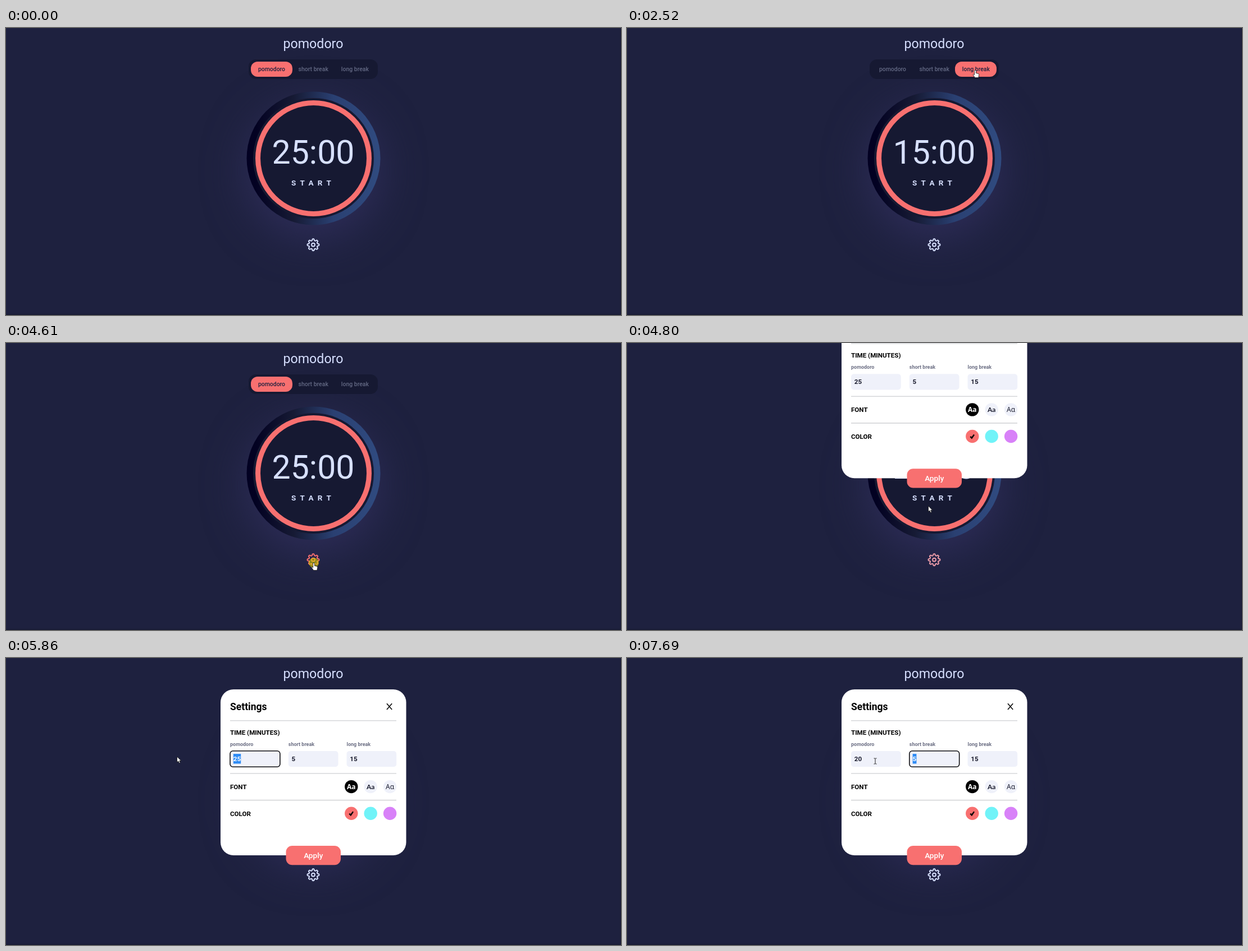
Animation, 1095 px wide and 512 px high, one loop 8 s. Source, as an HTML page:

```html
<!DOCTYPE html>
<html lang="en">
<head>
<meta charset="utf-8">
<title>pomodoro</title>
<style>
  html, body { margin: 0; width: 100%; height: 100%; overflow: hidden; background: #1e213f; }
  svg { display: block; width: 100vw; height: 100vh; font-family: Roboto, "Noto Sans", sans-serif; }
  .mid { text-anchor: middle; }
  .light { fill: #d7e0ff; }
  .tab { font-size: 10.45px; font-weight: 500; fill: #d7e0ff; fill-opacity: .4; }
  .tab.on { fill: #1e213f; fill-opacity: 1; }
  .head { font-size: 11.6px; font-weight: 700; }
  .label { font-size: 9px; font-weight: 700; fill: #6d7085; }
  .value { font-size: 11.6px; font-weight: 700; fill: #1a1c2e; }
  .value.sel { fill: #fff; }
  .rule { stroke: #d6d7da; stroke-width: 1.6; }
  .focus { fill: none; stroke: #101014; stroke-width: 1.6; }
  .aa { font-size: 12px; font-weight: 700; }
</style>
</head>
<body>
<svg viewBox="0 0 1095 512">
  <defs>
    <linearGradient id="rim">
      <stop offset="0" stop-color="#020022"/>
      <stop offset=".07" stop-color="#030222"/>
      <stop offset=".35" stop-color="#161a34"/>
      <stop offset=".65" stop-color="#2a4072"/>
      <stop offset="1" stop-color="#304b80"/>
    </linearGradient>
    <filter id="blur" x="-100%" y="-100%" width="300%" height="300%" color-interpolation-filters="sRGB">
      <feGaussianBlur stdDeviation="38"/>
    </filter>
  </defs>

  <circle cx="547.5" cy="255" r="119" fill="#2e2d59" filter="url(#blur)"/>
  <path d="M0 511H1095M1094.5 0V512" stroke="#181b34" stroke-width="2"/>
  <text class="mid light" x="547" y="36" font-size="23.2">pomodoro</text>

  <rect x="432" y="56" width="230" height="35" rx="13" fill="#161932"/>
  <rect id="pill" y="60" width="74" height="27" rx="12" fill="#f87070"/>
  <g id="tabs"></g>

  <circle cx="547.5" cy="232.5" r="119" fill="url(#rim)"/>
  <circle cx="547.5" cy="232.5" r="107.5" fill="#161932"/>
  <circle cx="547.5" cy="232.5" r="99" fill="none" stroke="#f87070" stroke-width="9"/>
  <text id="clock" class="mid light" x="547" y="242" font-size="59"></text>
  <text class="light" x="508" y="281" font-size="13.5" font-weight="700" letter-spacing="7.3">START</text>

  <g id="gear" transform="translate(547 386.7)" fill="none" stroke-width="2">
    <path id="cog" stroke-linejoin="round"/>
    <circle r="2.9"/>
  </g>

  <g id="modal">
    <rect x="382" y="56" width="330.5" height="296" rx="23" fill="#fff"/>
    <text x="399" y="92.5" font-size="17.5" font-weight="700">Settings</text>
    <path d="M678 81.3L687.2 92M687.2 81.3L678 92" stroke="#000" stroke-width="1.5"/>
    <path class="rule" d="M399 111.7H695M399 206H695M399 253.6H695"/>
    <text class="head" x="399" y="136.7">TIME (MINUTES)</text>
    <g id="fields"></g>
    <text class="head" x="399" y="234">FONT</text>
    <text class="head" x="399" y="281.5">COLOR</text>
    <g id="dots"></g>
    <path d="M611.3 277.6L613.8 280.4L618 274.2" fill="none" stroke="#000" stroke-width="2.4"/>
    <rect x="498.5" y="335" width="97.5" height="34.3" rx="11" fill="#f87070"/>
    <text class="mid" x="547.2" y="356.7" font-size="13.6" font-weight="500" fill="#fff">Apply</text>
  </g>

  <g id="cursor">
    <circle id="press" r="9" fill="#d6cd00" fill-opacity=".6"/>
    <path id="arrow" d="M0 0V10L2.3 8L4 11.6L5.8 10.8L4.2 7.3H7.3Z" fill="#fff" stroke="#111" stroke-width=".8"/>
    <path id="hand" d="M-1.4 1.6Q-1.4 .2 0 .2T1.4 1.6V5.4L5.2 6.3Q7 6.8 6.8 8.6L5.8 13.6H-.4L-4 8.6Q-3.6 7-1.4 8.4Z"
      fill="#fff" stroke="#111" stroke-width=".8"/>
    <path id="beam" d="M-2.5 -5H-.6L0 -4.4L.6 -5H2.5M0 -4.4V4.4M-2.5 5H-.6L0 4.4L.6 5H2.5" fill="none" stroke="#222" stroke-width="1"/>
  </g>
</svg>
<script>
const $ = id => document.getElementById(id);
const LOOP = 8000;
const names = ['pomodoro', 'short break', 'long break'];
const clocks = ['25:00', '5:00', '15:00'];
const fieldX = [399, 502.8, 606.5];

$('tabs').innerHTML = names.map((n, i) =>
  `<text class="tab mid" x="${473 + 74.2 * i}" y="77">${n}</text>`).join('');

$('fields').innerHTML = names.map((n, i) => {
  const x = fieldX[i];
  return `<text class="label" x="${x}" y="156.8">${n}</text>
    <rect x="${x}" y="166" width="88.7" height="28.3" rx="5" fill="#eff1fa"/>
    <rect class="focus" x="${x}" y="165.8" width="88.9" height="28.4" rx="5"/>
    <rect class="mark" x="${x + 5.8}" y="171" width="${i === 1 ? 6.8 : 13.4}" height="17.5" fill="#2f8cf5"/>
    <text class="value" x="${x + 5.8}" y="184">${['25', 5, 15][i]}</text>`;
}).join('');

const fonts = ['"Noto Sans"', 'Lato', '"Noto Sans"'];
$('dots').innerHTML = ['#f87070', '#70f3f8', '#d881f8'].map((c, i) => {
  const x = 614.8 + 34.4 * i;
  return `<circle cx="${x}" cy="229.6" r="11.7" fill="${i ? '#eff1fa' : '#000'}"/>
    <text class="aa mid" x="${x}" y="234" fill="${i ? '#1a1c2e' : '#fff'}"
      style='font-family:${fonts[i]},sans-serif;font-weight:${i > 1 ? 500 : 700}'>${i > 1 ? 'Aɑ' : 'Aa'}</text>
    <circle cx="${x}" cy="277.2" r="11.7" fill="${c}"/>`;
}).join('');

// eight rounded teeth as a polar curve
$('cog').setAttribute('d', 'M' + Array.from({ length: 160 }, (_, i) => {
  const a = i * Math.PI / 80, r = 9.1 + 1.45 * Math.tanh(1.8 * Math.cos(8 * a));
  return (r * Math.cos(a)).toFixed(2) + ' ' + (r * Math.sin(a)).toFixed(2);
}).join('L') + 'Z');

const bursts = [[260, 1040, 12], [1110, 1450, 6], [2110, 2870, 11], [2940, 3700, 11], [3770, 4460, 10],
  [4610, 5370, 12], [5440, 5860, 7], [6590, 7340, 10], [7410, 7690, 5]];

// pointer path: [time, x, y]
const path = [[260, 970, 492], [600, 657, 346], [1040, 614, 66], [1110, 612, 67], [1450, 566, 74], [2110, 566, 74],
  [2340, 620, 75], [2550, 620, 75], [2870, 468, 75], [3010, 468, 75], [3244, 470, 102], [3700, 559, 419],
  [3770, 558, 416], [4200, 548, 392], [4680, 548, 392], [4748, 543, 350], [4817, 536.5, 291], [5024, 541, 185],
  [5370, 450, 184], [5440, 424, 181], [5510, 424, 181], [5860, 304.5, 176], [6590, 304.5, 176],
  [6900, 400, 194], [7270, 522, 183], [7410, 522, 183], [7550, 431, 183], [7690, 442, 184]];

const presses = [[1650, 1780], [2410, 2500], [2940, 3010], [4610, 4680], [5440, 5850], [7340, 7680]];

const clamp = v => Math.max(0, Math.min(1, v));
const show = (el, on) => el.setAttribute('visibility', on ? 'inherit' : 'hidden');
const pick = (t, ...times) => times.filter(s => t >= s).length;

function snap(t) {
  const b = bursts.findLast(([start]) => t >= start);
  if (!b) return t;
  const step = (b[1] - b[0]) / (b[2] - 1);
  return Math.min(b[1], b[0] + step * Math.floor((t - b[0]) / step + .27));
}

function pointer(t) {
  const i = path.findIndex(k => k[0] > t);
  if (i < 1) return (i ? path.at(-1) : path[0]).slice(1);
  const [a, b] = [path[i - 1], path[i]], u = (t - a[0]) / (b[0] - a[0]);
  return [a[1] + (b[1] - a[1]) * u, a[2] + (b[2] - a[2]) * u];
}

function cursorShape(x, y, t, pressed) {
  if (t < 4690) {
    const onTab = y > 57 && y < 90 && x > 436 && x < 658;
    return onTab && t > 1150 || Math.hypot(x - 547, y - 387) < 12 ? 'hand' : 'arrow';
  }
  const onField = t > 5100 && y > 166 && y < 194 && fieldX.some(f => x > f && x < f + 89);
  return onField || pressed ? 'beam' : 'arrow';
}

function draw(t) {
  const s = snap(t);
  const tab = pick(t, 1780, 2490, 3010) % 3;
  $('pill').setAttribute('x', 436 + 74 * tab);
  document.querySelectorAll('.tab').forEach((el, i) => el.classList.toggle('on', i === tab));
  $('clock').textContent = clocks[tab];

  const hot = Math.min(clamp((s - 4130) / 300), clamp((5000 - s) / 300));
  const mix = (a, b) => Math.round(a + (b - a) * hot);
  $('gear').setAttribute('stroke', `rgb(${mix(215, 248)},${mix(224, 112)},${mix(255, 112)})`);

  const lift = s >= 5370 ? 0 : 111 * Math.exp((4817 - s) * .00877);
  $('modal').setAttribute('transform', `translate(0 ${-lift})`);
  show($('modal'), t >= 4610);

  const focused = t < 5440 ? -1 : pick(t, 7340);
  const selected = t >= 5600 && t < 6130 ? 0 : t >= 7460 ? 1 : -1;
  document.querySelectorAll('.focus').forEach((el, i) => show(el, i === focused));
  document.querySelectorAll('.mark').forEach((el, i) => show(el, i === selected));
  document.querySelectorAll('.value').forEach((el, i) => {
    el.classList.toggle('sel', i === selected);
    if (!i) el.textContent = ['25', '2', '20'][pick(t, 6130, 6590)];
  });

  const [x, y] = pointer(s);
  const pressed = presses.some(([a, b]) => t >= a && t < b);
  const shape = cursorShape(x, y, t, pressed);
  show($('cursor'), t >= 260);
  $('cursor').setAttribute('transform', `translate(${x} ${y})`);
  show($('press'), pressed);
  for (const id of ['arrow', 'hand', 'beam']) show($(id), id === shape);
}

const begin = performance.now();
(function tick() {
  draw((performance.now() - begin) % LOOP);
  requestAnimationFrame(tick);
})();
</script>
</body>
</html>
```
